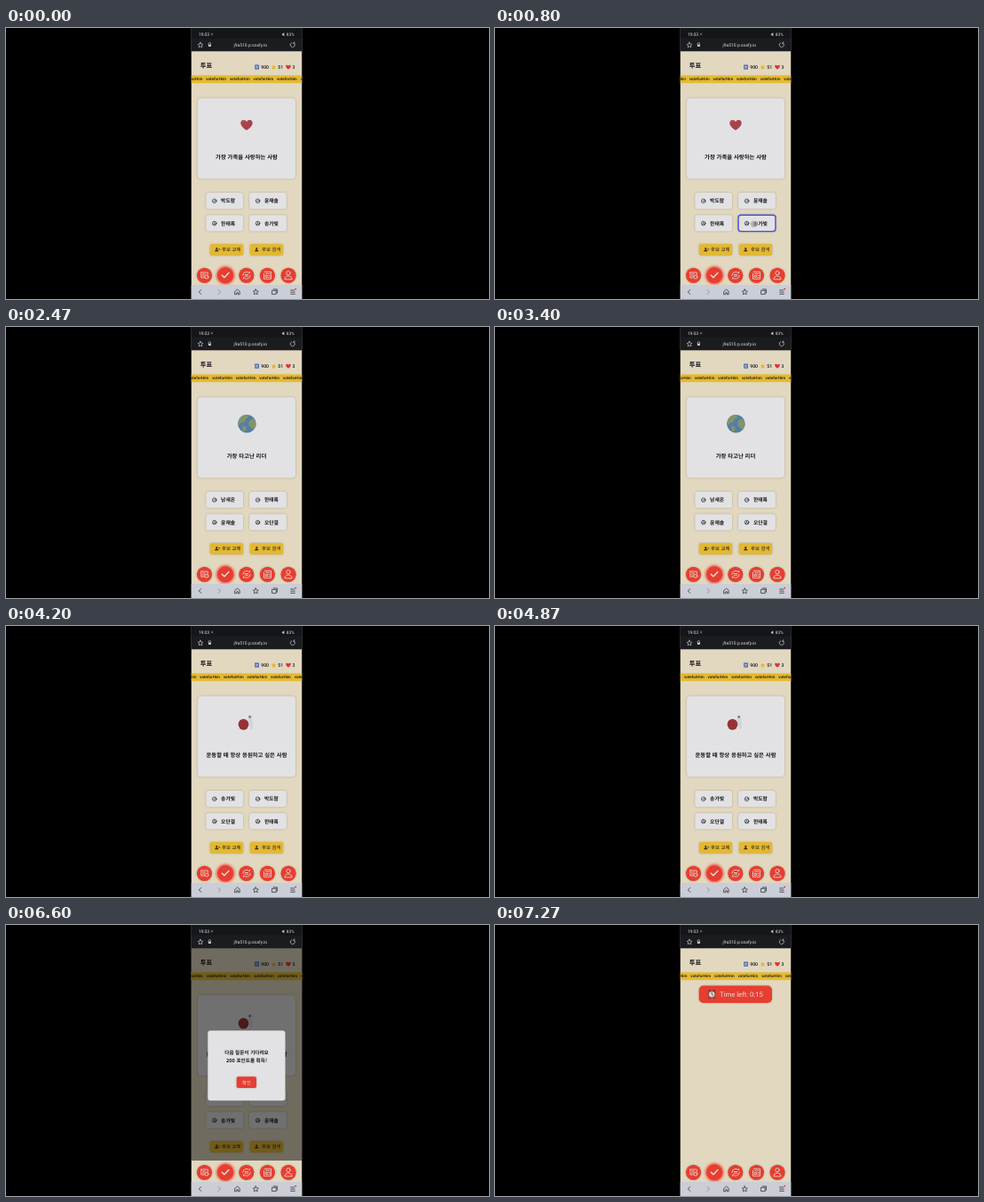
Recreate the animation shown at these times as an HTML page. Size 544 px wide and 306 px high, loop 7340 ms.

```html
<!DOCTYPE html>
<html lang="ko">
<head>
<meta charset="utf-8">
<title>투표</title>
<style>
  html, body { margin: 0; width: 100%; height: 100%; overflow: hidden; background: #000; }
  svg { display: block; width: 100%; height: 100%; }
  text { font-family: "Noto Sans CJK KR", "Noto Sans CJK", "Noto Sans CJK JP", sans-serif; fill: #17171a; text-rendering: geometricPrecision; }
  .ui { font-family: Roboto, "Noto Sans", sans-serif; }
  .mid { text-anchor: middle; }
  .bold { font-weight: 700; }
  .light { fill: #dcdce0; }
  .paper { fill: #e2e2e4; }
  .red { fill: #e63e31; }
  .line { fill: none; stroke: #e5dfda; stroke-width: .8; stroke-linecap: round; stroke-linejoin: round; }
  .dark { stroke: #33353b; }
  .chrome { stroke: #c7c8cc; stroke-width: .7; }
  .soft { filter: drop-shadow(0 .7px .8px rgba(70, 55, 20, .3)); }
</style>
</head>
<body>
<svg viewBox="0 0 544 306">
  <defs>
    <clipPath id="screen"><rect x="208.5" width="125" height="306"/></clipPath>
    <filter id="blur" x="-50%" y="-50%" width="200%" height="200%"><feGaussianBlur stdDeviation="1.5"/></filter>
  </defs>
  <rect width="544" height="306"/>
  <g clip-path="url(#screen)">
    <rect x="208.5" width="125" height="306" fill="#e2d8c0"/>

    <!-- page header -->
    <text class="bold" x="218.8" y="45" font-size="7.3">투표</text>
    <rect x="280.2" y="41.6" width="4.8" height="5.2" rx=".6" fill="#4665b5"/>
    <path class="line" d="M281.5 43.3h2.2M281.5 45h2.2" stroke-width=".5"/>
    <text class="ui" x="287.2" y="46.1" font-size="5.2" font-weight="500">900</text>
    <path d="M301.5 41.4l.9 1.8 2 .3-1.5 1.4.4 2-1.8-1-1.8 1 .4-2-1.5-1.4 2-.3z" fill="#e5b633"/>
    <text class="ui" x="306.2" y="46.1" font-size="5.2" font-weight="500">51</text>
    <path d="M318 46.8c-5-3.5-2.2-6.7 0-4.1 2.2-2.6 5 .6 0 4.1z" fill="#df3036"/>
    <text class="ui" x="322.6" y="46.1" font-size="5.2" font-weight="500">3</text>

    <rect x="208.5" y="53.4" width="125" height="8.8" fill="#e5ba2f"/>
    <g id="ticker"></g>

    <g id="vote">
      <rect class="paper soft" x="216" y="79.3" width="110" height="91" rx="4"/>
      <g class="picture">
        <path d="M271 115.6c-3-2.2-6.7-5-6.7-8.4 0-4.1 4.8-4.8 6.7-1.3 1.9-3.5 6.7-2.8 6.7 1.3 0 3.4-3.7 6.2-6.7 8.4z" fill="#a8434b"/>
        <path d="M266 106.5c.2-1.4 1.4-2 2.5-1.5" fill="none" stroke="#c8777a" stroke-width=".8"/>
      </g>
      <g class="picture" fill="#648f93">
        <path d="M266.5 99.8c2.9 0 3.6 3.5 2.9 7 .4 3.2.5 8.8-2 8.8-2.9 0-2.3-5-3-8.2-.9-4-.6-7.6 2.1-7.6z"/>
        <path d="M274 99.8c-2.9 0-3.6 3.5-2.9 7-.4 3.2-.5 8.8 2 8.8 2.9 0 2.3-5 3-8.2.9-4 .6-7.6-2.1-7.6z"/>
        <path d="M266 102.3l1 4.5M274.4 102.3l-1 4.5" fill="none" stroke="#a59a82" stroke-width="1.1"/>
      </g>
      <g class="picture">
        <circle cx="271.4" cy="109.2" r="10.3" fill="#527fa4"/>
        <path d="M263 103c3-4 6-4 9-3.7l1 3-3 1.5-1 3.2-4 1-3 3c-1-3-.5-5.500 1-8zM274 106l4-3c3 3 4 6 3 10l-3 3-3-3-2-3zM266 111l5 2-1 4-3 1.500z" fill="#83936d"/>
      </g>
      <g class="picture">
        <path d="M273 105l4-5 1 16-3 1z" fill="#cfd5dc"/>
        <circle cx="267.5" cy="111" r="5.9" fill="#983335"/>
        <path d="M263.300 115.200a5.900 5.900 0 0 0 8.400 0" fill="none" stroke="#6e292c" stroke-width=".8"/>
        <rect x="273.300" y="101.300" width="2.600" height="2.600" rx=".6" fill="#777b86"/>
      </g>
      <text id="question" class="mid bold" x="271" y="147.700" font-size="6.38"></text>
      <g id="options"></g>
      <g id="actions"></g>
    </g>

    <g id="timer">
      <rect class="red soft" x="229.700" y="68.500" width="82.300" height="19.500" rx="5"/>
      <path d="M240.500 75l2-1.700M248 75l-2-1.700M241.500 82.200l-1 1M247 82.200l1 1" stroke="#653630" stroke-width="1.200"/>
      <circle cx="244.200" cy="78.300" r="3.900" fill="#e2d8d2" stroke="#6b3a35"/>
      <path d="M244.200 76v2.500l1.600 1" class="line dark" stroke-width=".7"/>
      <text class="ui" x="253" y="81" font-size="7.7" style="fill:#e8dfdc">Time left: 0:15</text>
    </g>

    <g id="dialog">
      <rect x="208.500" y="26" width="125" height="240" opacity=".5"/>
      <rect class="paper" x="227.300" y="119.200" width="87.200" height="79" rx="3"/>
      <text class="mid bold" x="271" y="146.400" font-size="5.6">다음 질문이 기다려요</text>
      <text class="mid bold" x="271" y="155.400" font-size="5.6">200 포인트를 획득!</text>
      <rect class="red soft" x="259.700" y="171.200" width="22.300" height="12.800" rx="1.800"/>
      <text class="mid" x="270.900" y="179.500" font-size="5.3" style="fill:#eee2df">확인</text>
    </g>
    <circle id="touch" cx="291.500" cy="221.300" r="3.600" fill="#8b8b92" fill-opacity=".55" stroke="#c9c9cf" stroke-width=".5"/>

    <!-- app navigation -->
    <g id="nav"></g>
    <g class="line">
      <path d="M219.800 276h7.400v3M219.800 276v6h3.700M221.500 278h3M221.500 280h2"/><circle cx="226" cy="281.200" r="1.900"/>
      <path d="M243.300 279.300l2.600 2.500 5-5.300" stroke-width="1.400"/>
      <path d="M266.800 279.300a4.200 4.200 0 0 1 7.500-2.300l.3-1.700M275.200 279.300a4.200 4.200 0 0 1-7.500 2.300l-.3 1.700M269.200 278.500h3.500M269.200 280.200h3.500"/>
      <path d="M291.300 275.300h7.200v8h-8v-6M292.600 277.300h4.400M292.600 279.400h1.800v2h-1.800zM296 279.500h1.200M296 281.400h1.200"/>
      <circle cx="318" cy="276.700" r="2.200"/><path d="M313.900 283.400c0-4.600 8.200-4.600 8.200 0z"/>
    </g>

    <!-- browser -->
    <rect x="208.500" width="125" height="26.300" fill="#1b1c20"/>
    <rect x="208.500" width="125" height="11.500" fill="#15161a"/>
    <text class="ui light" x="216.700" y="8.900" font-size="5">19:03</text>
    <path class="line chrome" d="M231 6l2 2M233 6l-2 2" opacity=".6"/>
    <path d="M310.500 7.200l2.800-2v4z" fill="#c7c8cc"/>
    <text class="ui light" x="315.800" y="8.900" font-size="4.800">83%</text>
    <g class="line chrome">
      <path d="M219 16.200l.9 1.900 2 .3-1.500 1.400.4 2-1.800-1-1.800 1 .4-2-1.500-1.400 2-.3z"/>
      <path d="M228.200 18.600v-.8a1.200 1.200 0 0 1 2.400 0v.8"/>
      <rect x="227.900" y="18.700" width="3" height="2.300" fill="#c7c8cc" stroke="none"/>
      <path d="M324.600 17.100a2.600 2.600 0 1 1-2.800-.5M324.800 15.700v1.600h-1.500"/>
    </g>
    <text class="ui light mid" x="275.300" y="20.700" font-size="5">j9a510.p.ssafy.io</text>
    <rect x="208.500" y="290" width="125" height="16" fill="#cbced6"/>
    <g class="line dark">
      <path d="M219.800 295.500l-2.500 2.500 2.500 2.500"/>
      <path d="M239 295.500l2.500 2.500-2.500 2.500" opacity=".45"/>
      <path d="M258 297.300l2.600-2.200 2.600 2.200v3.500h-1.800v-2h-1.600v2h-1.800z"/>
      <path d="M281.300 295l.9 1.900 2.100.3-1.500 1.500.4 2.100-1.900-1-1.900 1 .4-2.100-1.500-1.500 2.100-.3z"/>
      <path d="M300 296.300h4.200v4.300H300zM301.300 295h4.200v4.300"/>
      <path d="M320.700 296h4M320.700 298.200h4.600M320.700 300.400h4.600"/>
    </g>
    <circle class="red" cx="326.200" cy="294.700" r="1"/>
  </g>
</svg>
<script>
const LOOP = 7340, FPS = 15, LAST_STEP = 109;
const TICKER = { start: 225.3, pitch: 26.6, speed: 0.008 };
const DIALOG = [5200, 6930];
const TAP_LEAD = 270;

const [A, B, C, D, E, F] = ['박도람', '윤재솔', '한태록', '송가빛', '오단결', '남새온'];
const scenes = [
  { at: 0, picture: 0, question: '가장 가족을 사랑하는 사람', names: [A, B, C, D] },
  { at: 930, picture: 1, question: '같이 국내 여행 가고 싶은 사람', names: [E, C, B, F] },
  { at: 2270, picture: 2, question: '가장 타고난 리더', names: [F, C, B, E] },
  { at: 3730, picture: 3, question: '운동할 때 항상 응원하고 싶은 사람', names: [D, A, E, C] },
  { at: 5400, picture: 3, question: '운동할 때 항상 응원하고 싶은 사람', names: [F, E, D, B] }
];

const $ = id => document.getElementById(id);
const show = (el, on) => { el.style.display = on ? '' : 'none'; };
const repeat = (n, draw) => Array.from({ length: n }, (_, i) => draw(i)).join('');

$('ticker').innerHTML = repeat(9, i =>
  `<text class="ui" x="${TICKER.start + (i - 1) * TICKER.pitch}" y="59.4" font-size="4.5" font-weight="500">voteforHim</text>`);

$('options').innerHTML = repeat(4, i => {
  const x = 225.3 + (i % 2) * 48.8, y = 186 + (i >> 1) * 25.3;
  const mark = i < 2 ? 'M-.9 0l.7.8 1.300-1.700' : 'M-1.300 1.200c.4-1.500 2.200-1.500 2.600 0M0-1.100v.7';
  return `<g class="option">
    <rect class="paper soft" x="${x}" y="${y}" width="41.8" height="18.3" rx="2.8"/>
    <g transform="translate(${x + 9.5} ${y + 9.3})" class="line dark" stroke-width=".6"><circle r="2.300"/><path d="${mark}"/></g>
    <text class="bold" x="${x + 16.8}" y="${y + 11.2}" font-size="5.8"></text></g>`;
});

$('actions').innerHTML = repeat(2, i => {
  const x = 229.8 + i * 45;
  return `<rect class="soft" x="${x}" y="244" width="37.3" height="12.8" rx="2" fill="#e3b832"/>
    <g transform="translate(${x + 7.5} 250)" fill="#302b1d"><circle cy="-1" r="1.100"/><path d="M-2.100 2.200c0-2.700 4.200-2.700 4.200 0z"/>
    ${i ? '' : '<path d="M2 -.2h2M3-1.200v2" stroke="#302b1d" stroke-width=".5"/>'}</g>
    <text x="${x + 13.3}" y="252.200" font-size="5.4" font-weight="500">후보 ${i ? '검색' : '교체'}</text>`;
});

$('nav').innerHTML = repeat(5, i => {
  const x = 223.5 + i * 23.65, active = i === 1;
  const glow = active ? `<circle cx="${x}" cy="279.300" r="10.300" fill="#f04a3c" filter="url(#blur)"/>` : '';
  return `${glow}<circle class="red ${active ? '' : 'soft'}" cx="${x}" cy="279.300" r="${active ? 9 : 8.6}"/>`;
});

const pictures = document.querySelectorAll('.picture');
const options = [...document.querySelectorAll('.option')];
const chosen = options[3].querySelector('rect');
let current;

function setScene(scene) {
  if (scene === current) return;
  current = scene;
  pictures.forEach((el, i) => show(el, i === scene.picture));
  $('question').textContent = scene.question;
  options.forEach((el, i) => { el.querySelector('text').textContent = scene.names[i]; });
}

function render(now) {
  const step = Math.min(LAST_STEP, Math.floor((now % LOOP) * FPS / 1000 + 0.01));
  const t = step * 1000 / FPS;
  const index = scenes.findLastIndex(scene => t >= scene.at);
  const next = scenes[index + 1];
  const tapped = !!next && t >= next.at - (index === 3 ? 400 : TAP_LEAD);

  setScene(scenes[index]);
  $('ticker').setAttribute('transform', `translate(${-t * TICKER.speed} 0)`);
  chosen.style.stroke = tapped ? '#4655d8' : 'none';
  chosen.style.strokeWidth = 1.4;
  show($('touch'), tapped);
  show($('dialog'), t >= DIALOG[0] && t < DIALOG[1]);
  show($('vote'), t < DIALOG[1]);
  show($('timer'), t >= DIALOG[1]);
}

const origin = performance.now();
function tick() {
  render(performance.now() - origin);
  requestAnimationFrame(tick);
}
tick();
</script>
</body>
</html>
```
